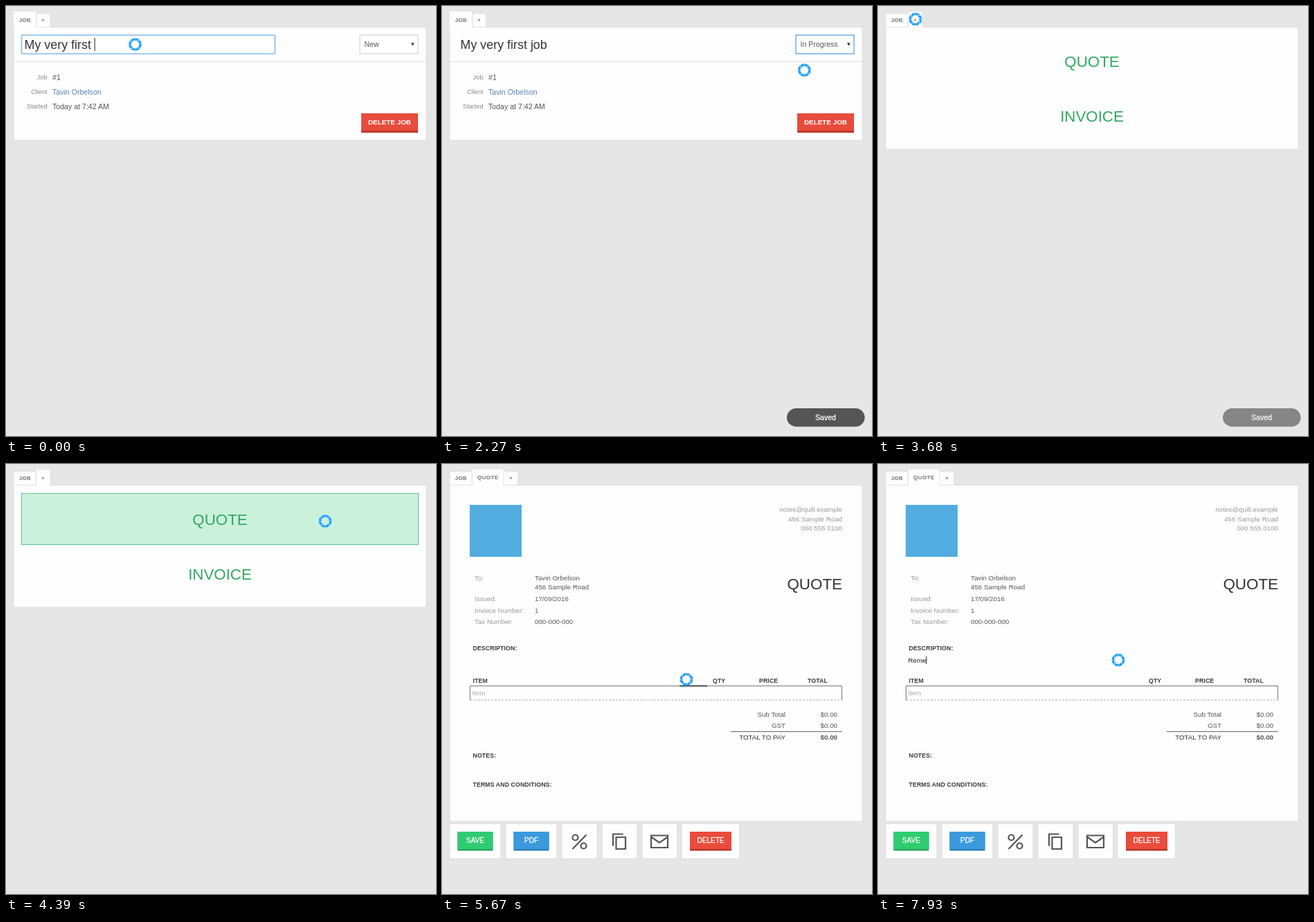
Write an HTML page that moves like this. It is 621x621 px and loops after 8000 ms.

```html
<!DOCTYPE html>
<html lang="en">
<head>
<meta charset="utf-8">
<title>Job to quote</title>
<style>
html, body { margin: 0; height: 100%; overflow: hidden; background: #e6e6e6; }
svg { display: block; width: 100vw; height: 100vh; font-family: "Liberation Sans", Arial, sans-serif; }
text { white-space: pre; }
.panel { fill: #fefefe; stroke: #d8d8d8; stroke-width: .8; }
.tab { fill: #fdfdfd; stroke: #dedede; stroke-width: .6; }
.active { fill: #fefefe; }
.tabText { font-size: 8px; letter-spacing: .5px; fill: #555; stroke: #555; stroke-width: .15; }
.title { font-size: 17.9px; fill: #333; }
.label { font-size: 9.15px; fill: #888; text-anchor: end; }
.value { font-size: 10.6px; fill: #555; }
.link { fill: #5a83b0; }
.choice { font-size: 22.3px; fill: #31a862; text-anchor: middle; }
.doc { font-size: 9.75px; fill: #555; }
.soft { fill: #999; }
.end { text-anchor: end; }
.head { font-size: 8.75px; font-weight: bold; fill: #3a3a3a; letter-spacing: .1px; }
.button { font-size: 10px; fill: #fff; stroke: #fff; stroke-width: .3; text-anchor: middle; }
.toastText { font-size: 10.5px; fill: #fff; stroke: #fff; stroke-width: .3; text-anchor: middle; }
.icon { fill: none; stroke: #555; stroke-width: 2.2; }
.caret { stroke: #222; stroke-width: 1; }
</style>
</head>
<body>
<svg viewBox="0 0 621 621">
  <rect width="621" height="621" fill="#e6e6e6"/>

  <g id="jobPage">
    <rect class="panel" x="11" y="30.5" width="596" height="163.5"/>
    <rect class="active" x="11" y="8" width="32" height="24"/>
    <rect class="tab" x="44" y="11" width="19.5" height="19.5"/>
    <text class="tabText" x="19" y="22.5">JOB</text>
    <text class="tabText" x="51" y="23">+</text>
    <path d="M11 80.5H607" stroke="#dedede"/>
    <rect id="titleBox" x="22.5" y="42" width="366" height="27" rx="1.5" fill="#fff" stroke="#86b9ea" stroke-width="1.6"/>
    <text id="title" class="title" x="26.5" y="62"></text>
    <path id="titleCaret" class="caret" d="M0 46V65"/>
    <rect id="select" x="511" y="42" width="84" height="27" fill="#fff"/>
    <text id="status" class="value" x="517.5" y="59"></text>
    <path d="M585 53.3h4.6l-2.3 4.4z" fill="#333"/>
    <text class="label" x="59.5" y="106">Job</text>
    <text class="label" x="59.5" y="127">Client</text>
    <text class="label" x="59.5" y="148">Started</text>
    <text class="value" x="67" y="106.5">#1</text>
    <text class="value link" x="67" y="127.5">Tavin Orbelson</text>
    <text class="value" x="67" y="148.5">Today at 7:42 AM</text>
    <rect x="513" y="155" width="82" height="28" fill="#c0392b"/>
    <rect x="513" y="155" width="82" height="25" fill="#e74c3c"/>
    <text x="554" y="171" font-size="9.9" font-weight="bold" fill="#fff" text-anchor="middle">DELETE JOB</text>
    <g id="menu">
      <rect x="511" y="69" width="83.5" height="55.5" fill="#fff" stroke="#86b3df"/>
      <rect id="marker" x="511.5" width="82.5" height="13.3" fill="#1e90ff"/>
    </g>
  </g>

  <g id="choicePage">
    <rect class="panel" x="11" y="30.5" width="596" height="176.5"/>
    <rect class="tab" x="11" y="11" width="32" height="19.5"/>
    <rect class="active" x="44" y="8.5" width="19.5" height="23.5"/>
    <text class="tabText" x="19" y="23">JOB</text>
    <text class="tabText" x="51" y="23">+</text>
    <rect id="hover" x="22.5" y="42.5" width="573" height="74" fill="#caf1dc" stroke="#62c39a"/>
    <text class="choice" x="309" y="88">QUOTE</text>
    <text class="choice" x="309" y="166.5">INVOICE</text>
  </g>

  <g id="quotePage">
    <rect class="panel" x="11" y="30.5" width="596" height="485.5"/>
    <rect class="tab" x="11" y="11" width="32" height="19.5"/>
    <rect class="active" x="44" y="8" width="44.5" height="24"/>
    <rect class="tab" x="89" y="11" width="20.5" height="19.5"/>
    <text class="tabText" x="19" y="23">JOB</text>
    <text class="tabText" x="51" y="22">QUOTE</text>
    <text class="tabText" x="97" y="23">+</text>
    <rect x="40" y="59" width="75" height="75" fill="#52ade0"/>
    <g class="end">
      <text class="doc soft" x="578" y="69">notes@quill.example</text>
      <text class="doc soft" x="578" y="82.5">456 Sample Road</text>
      <text class="doc soft" x="578" y="96">000 555 0100</text>
      <text x="578" y="181" font-size="22.4" fill="#333">QUOTE</text>
    </g>
    <g class="doc soft">
      <text x="47" y="167.5">To:</text>
      <text x="47" y="197.5">Issued:</text>
      <text x="47" y="214.5">Invoice Number:</text>
      <text x="47" y="231">Tax Number:</text>
    </g>
    <g class="doc">
      <text x="134" y="167.5">Tavin Orbelson</text>
      <text x="134" y="181">456 Sample Road</text>
      <text x="134" y="197.5">17/09/2016</text>
      <text x="134" y="214.5">1</text>
      <text x="134" y="231">000-000-000</text>
    </g>
    <g class="head">
      <text x="44.5" y="269">DESCRIPTION:</text>
      <text x="44.5" y="315.5">ITEM</text>
      <text x="391" y="315.5">QTY</text>
      <text x="458" y="315.5">PRICE</text>
      <text x="528" y="315.5">TOTAL</text>
      <text x="44.5" y="423.5">NOTES:</text>
      <text x="44.5" y="465.5">TERMS AND CONDITIONS:</text>
    </g>
    <rect id="fieldHover" x="40.5" y="274.5" width="537" height="19" fill="none" stroke="#ddd" stroke-dasharray="3 2"/>
    <text id="description" class="doc" x="43.5" y="286.5" style="fill:#222"></text>
    <path id="fieldCaret" class="caret" d="M0 277.5V289"/>
    <path d="M40.5 341V320.5H577.5V341" fill="none" stroke="#777"/>
    <path d="M41 340.8H577" stroke="#aaa" stroke-dasharray="3 2"/>
    <path id="rowMark" d="M343 320.5H383" stroke="#0c1c2c" stroke-width="1.4"/>
    <text class="doc" x="43.5" y="334" style="fill:#aaa">Item</text>
    <g class="doc end">
      <text x="496" y="364.5">Sub Total</text><text x="571" y="364.5">$0.00</text>
      <text x="496" y="381">GST</text><text x="571" y="381">$0.00</text>
      <text x="496" y="398" fill="#333">TOTAL TO PAY</text><text x="571" y="398" font-weight="bold">$0.00</text>
    </g>
    <path d="M417 386.5H578" stroke="#666"/>
    <g id="actions"></g>
    <g class="icon">
      <circle cx="192.5" cy="539.5" r="4"/><circle cx="204.5" cy="551.5" r="4"/>
      <path d="M188.5 556L208.500 535.500"/>
      <path d="M247 551.500V534.500H261.500M251.500 539h13.500v17h-13.500z"/>
      <path d="M302 536.500h24v17.500h-24zM302 538.500L314 547L326 538.500"/>
    </g>
  </g>

  <g id="toastA"></g>
  <g id="toastB"></g>
  <g id="pointer">
    <circle r="7.500" fill="none" stroke="#1c9df5" stroke-width="3.700"/>
  </g>
</svg>
<script>
const LOOP = 8000, STEP = 90;
const el = id => document.getElementById(id);
const add = (id, markup) => el(id).insertAdjacentHTML("beforeend", markup);
const show = (id, on) => el(id).style.display = on ? "" : "none";
const between = (t, from, to) => t >= from && t < to;

const options = ["New", "In Progress", "Invoiced Out", "Completed"];
const optionNodes = options.map((name, i) => {
  add("menu", `<text class="value" x="517.5" y="${79.7 + 13.2 * i}">${name}</text>`);
  return el("menu").lastElementChild;
});

for (const [x, width] of [[11, 74], [92, 74], [173, 51], [231, 51], [289, 50.5], [346, 83.5]])
  add("actions", `<rect class="panel" x="${x}" y="519.5" width="${width}" height="50.5"/>`);
for (const [name, x, width, fill, edge] of [
  ["SAVE", 22.5, 51, "#2ecc71", "#27a75c"],
  ["PDF", 103.5, 51, "#3a9add", "#2d7fba"],
  ["DELETE", 358, 60, "#ea4b3c", "#b5362a"]
]) add("actions", `<rect x="${x}" y="531" width="${width}" height="27.5" fill="${edge}"/>
  <rect x="${x}" y="531" width="${width}" height="25" fill="${fill}"/>
  <text class="button" x="${x + width / 2}" y="547">${name}</text>`);

for (const id of ["toastA", "toastB"])
  add(id, `<rect x="498" y="581" width="112.500" height="26.500" rx="13.250" fill="#555"/>
    <text class="toastText" x="554" y="597.5">Saved</text>`);

for (let angle = 0; angle < 360; angle += 45)
  add("pointer", `<path d="M4.500 -3L9 1" transform="rotate(${angle})" stroke="#cfeaff" stroke-width=".8"/>`);

// Keys are [time, ...values]; values run straight from one key to the next.
function at(keys, t) {
  const next = keys.findIndex(key => key[0] > t);
  if (next === 0) return keys[0].slice(1);
  if (next < 0) return keys[keys.length - 1].slice(1);
  const a = keys[next - 1], b = keys[next], p = (t - a[0]) / (b[0] - a[0]);
  return a.slice(1).map((v, i) => v + (b[i + 1] - v) * p);
}

const pointerPath = [
  [0, 186.5, 55.5], [630, 186.5, 55.5], [810, 255, 63], [1080, 500, 48], [1260, 594, 24],
  [1350, 594, 24], [1440, 541, 56], [1530, 541, 56], [1890, 545, 90], [2160, 545, 90],
  [2430, 480, 98], [2700, 260, 108], [2880, 132, 103.5], [3060, 60, 62], [3240, 31, 36],
  [3510, 54, 19], [3690, 54, 19], [3870, 130, 32], [4140, 350, 75], [4410, 461, 82.5],
  [5220, 461, 84], [5400, 420, 190], [5580, 366, 322], [5670, 353, 311],
  [6030, 349, 275], [6390, 347, 283]
];
// Toast keys: time, opacity, vertical offset.
const toastPaths = {
  toastA: [[1620, 0, 0], [1980, 1, 0], [2340, 1, 0], [2520, .97, -31], [2880, .83, -31], [3420, 0, -31]],
  toastB: [[2340, 0, 9], [2610, 1, 0], [2880, .92, 0], [3690, .66, 0], [4140, 0, 0]]
};

const typed = (text, start, times, t) => text.slice(0, start + times.filter(time => t >= time).length);

function placeCaret(id, textId, on) {
  show(id, on);
  const text = el(textId);
  const x = +text.getAttribute("x") + text.getComputedTextLength();
  el(id).setAttribute("transform", `translate(${x + .3} 0)`);
}

function draw(t) {
  const onJob = t < 3690, onQuote = t >= 4860;
  show("jobPage", onJob);
  show("choicePage", !onJob && !onQuote);
  show("quotePage", onQuote);

  if (onJob) {
    el("title").textContent = typed("My very first job", 14, [90, 180, 270], t);
    show("titleBox", t < 1440);
    placeCaret("titleCaret", "title", t < 810 || between(t, 1260, 1440));
    const focused = t >= 1440;
    el("select").setAttribute("stroke", focused ? "#73afea" : "#ccc");
    el("select").setAttribute("stroke-width", focused ? 1.5 : 1);
    el("status").textContent = options[t < 2250 ? 0 : 1];
    show("menu", between(t, 1440, 2250));
    const marked = t < 1800 ? 0 : 1;
    el("marker").setAttribute("y", 69.7 + 13.2 * marked);
    optionNodes.forEach((node, i) => {
      node.style.fill = i === marked ? "#fff" : "";
      node.style.stroke = i === marked ? "#fff" : "none";
      node.style.strokeWidth = .3;
    });
  }

  el("hover").style.opacity = at([[3870, 0], [4140, 1]], t)[0];

  if (onQuote) {
    el("description").textContent = typed("Reme", 0, [7560, 7650, 7830, 7920], t);
    show("fieldHover", between(t, 6120, 6660));
    show("rowMark", between(t, 5580, 5760));
    placeCaret("fieldCaret", "description", between(t, 6750, 7290) || t >= 7560);
  }

  for (const id in toastPaths) {
    const [opacity, y] = at(toastPaths[id], t);
    el(id).style.opacity = opacity;
    el(id).setAttribute("transform", `translate(0 ${y})`);
  }
  el("pointer").setAttribute("transform", `translate(${at(pointerPath, t)})`);
}

function frame() {
  const t = performance.now() % LOOP;
  draw(Math.floor((t + 20) / STEP) * STEP);
  requestAnimationFrame(frame);
}
frame();
</script>
</body>
</html>
```
